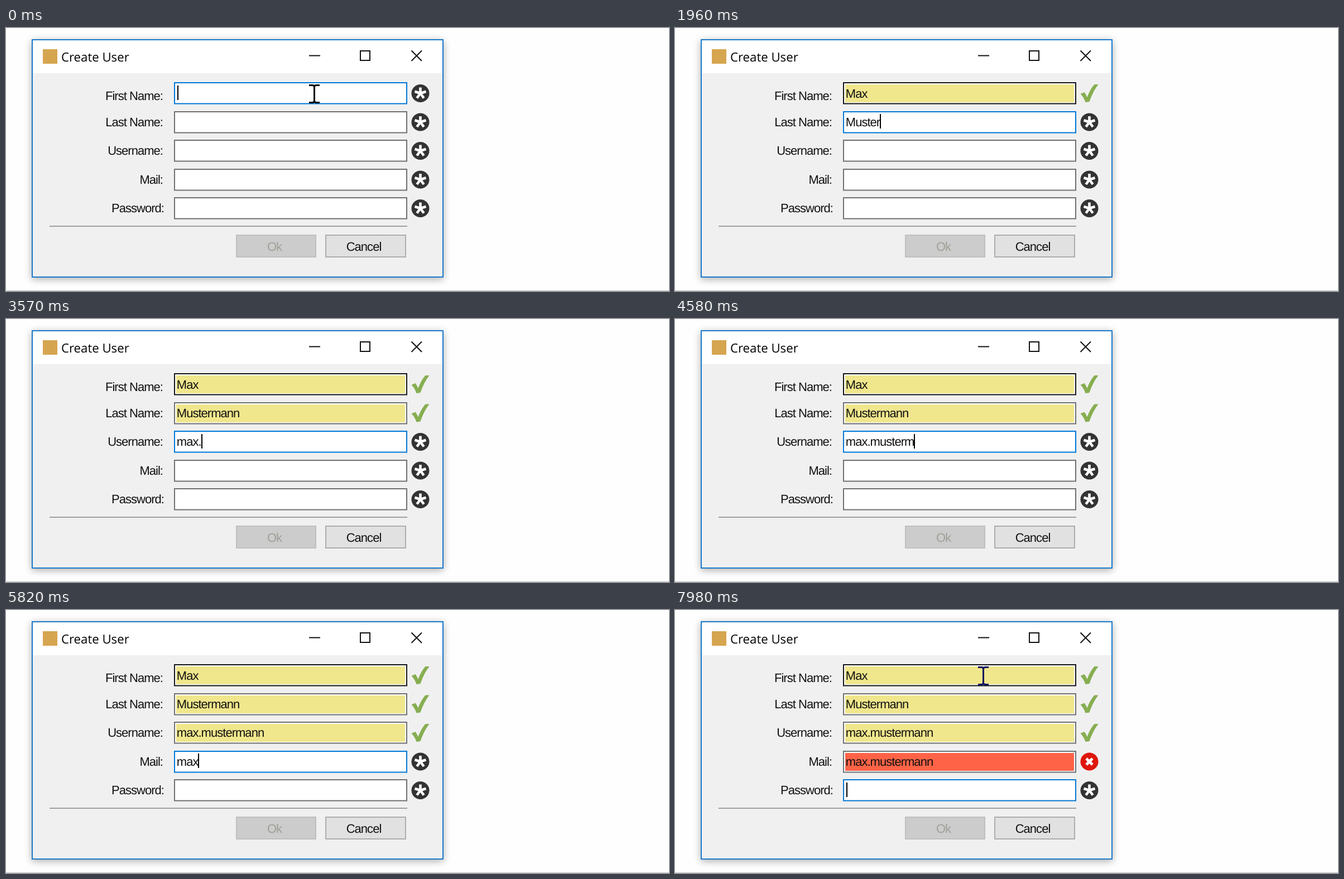
These frames come from a looping animation (1188x471 px, 8000 ms). An HTML page:

```html
<!DOCTYPE html>
<html lang="en">
<head>
<meta charset="utf-8">
<title>Create User</title>
<style>
  html, body { margin: 0; width: 100%; height: 100%; overflow: hidden; background: #fefefe; }
  svg { display: block; width: 1188px; height: 471px; }
  text { font: 22px "Liberation Sans", Arial, sans-serif; letter-spacing: -0.97px; fill: #111; text-rendering: geometricPrecision; white-space: pre; }
  .title { font: 22.2px "Open Sans", sans-serif; letter-spacing: 0; fill: #000; }
  .end { text-anchor: end; }
  .mid { text-anchor: middle; }
  .shadow { filter: blur(7px); }
</style>
</head>
<body>
<svg id="stage" viewBox="0 0 1188 471" xmlns="http://www.w3.org/2000/svg">
  <defs>
    <g id="required">
      <circle r="16" fill="#333"/>
      <g id="arms" stroke="#fff" stroke-width="4.6"></g>
    </g>
    <path id="valid" fill="#86ae50" d="M-16 1 L-9 -2 Q-6 2 -4 7 Q1 -7 9 -16 H16 Q6 -3 0 15 L-7 16 Q-10 7 -16 1Z"/>
    <g id="invalid">
      <circle r="16" fill="#df160c"/>
      <path d="M-5.5 -5.5 L5.5 5.5 M5.5 -5.5 L-5.5 5.5" stroke="#fff" stroke-width="5"/>
    </g>
  </defs>

  <rect y="470" width="1188" height="1" fill="#bdbdbd"/>
  <rect class="shadow" x="46" y="23" width="738" height="427" fill="#000" opacity=".32"/>
  <rect x="47" y="21" width="736" height="425" fill="#f0f0f0" stroke="#1a7acb" stroke-width="2"/>
  <rect x="48" y="22" width="734" height="59" fill="#fff"/>
  <rect x="66" y="38" width="26" height="26" fill="#d6a550"/>
  <text class="title" x="99" y="60">Create User</text>
  <path d="M543 49.5 H563 M635 41 H652 V58 H635Z M726.5 40.5 L745 59 M745 40.5 L726.5 59" fill="none" stroke="#111" stroke-width="2"/>

  <g id="rows"></g>

  <rect x="78" y="354" width="641" height="2" fill="#a0a0a0"/>
  <rect x="413" y="371" width="142" height="39" fill="#ccc" stroke="#bfbfbf" stroke-width="2"/>
  <text class="mid" x="481" y="399" style="fill:#a09f98">Ok</text>
  <rect x="573" y="371" width="143" height="39" fill="#e1e1e1" stroke="#adadad" stroke-width="2"/>
  <text class="mid" x="641" y="399">Cancel</text>

  <rect id="caret" width="2" height="26" fill="#000"/>
  <path id="pointer" fill="none" stroke-width="3" d="M543 102.5 H549 Q552.5 102.5 552.5 106 Q552.5 102.5 556 102.5 H562 M552.5 105 V131 M543 133.5 H549 Q552.5 133.5 552.5 130 Q552.5 133.5 556 133.5 H562"/>
</svg>
<script>
const LOOP = 8000, FADE_STEP = 77, TEXT_X = 305.8;
const BLUE = [0, 120, 215], GRAY = [112, 112, 112], BLACK = [22, 22, 22];
const KHAKI = "#f0e68c", TOMATO = "#ff6347";

// keys: [time, letters typed so far]; left: when the field is tabbed out of
const FIELDS = [
  { label: "First Name:", labelX: 281, value: "Max", left: 780,
    keys: [[400, 1], [550, 2], [630, 3]] },
  { label: "Last Name:", labelX: 281, value: "Mustermann", left: 2410,
    keys: [[1400, 1], [1630, 2], [1780, 4], [1940, 6], [2090, 7], [2170, 8], [2330, 10]] },
  { label: "Username:", labelX: 281, value: "max.mustermann", left: 5110,
    keys: [[3110, 1], [3190, 2], [3260, 3], [3570, 4], [3880, 5], [4030, 6], [4110, 7], [4260, 8],
           [4340, 9], [4490, 10], [4570, 11], [4730, 12], [4880, 13], [4960, 14]] },
  { label: "Mail:", labelX: 281, value: "max.mustermann", left: 7750, wrong: true,
    keys: [[5500, 1], [5580, 2], [5650, 3], [5890, 4], [6120, 5], [6430, 6], [6580, 7], [6740, 8],
           [6890, 9], [7050, 10], [7200, 11], [7290, 12], [7520, 13], [7590, 14]] },
  { label: "Password:", labelX: 283, value: "", left: Infinity, keys: [] }
];

const $ = id => document.getElementById(id);
const rowY = (top, i) => Math.round(top + 51.5 * i);
const mix = (a, b, p) => `rgb(${a.map((v, k) => Math.round(v + (b[k] - v) * p))})`;

// Border transition, advancing in coarse steps and easing out
function fade(since) {
  const p = Math.min(1, Math.max(0, Math.floor(since / FADE_STEP) / 4));
  return 1 - (1 - p) ** 2;
}

$("arms").innerHTML = [0, 72, 144, 216, 288]
  .map(a => `<path d="M0 0 V-10.5" transform="rotate(${a})"/>`).join("");

$("rows").innerHTML = FIELDS.map((f, i) => {
  const y = rowY(97, i), base = rowY(125, i) - (i ? 1 : 0);
  return `<text class="end" x="${f.labelX}" y="${i ? base : 129}">${f.label}</text>
    <rect id="box${i}" x="302" y="${y + 1}" width="416" height="37.5" fill="#fff" stroke-width="2"/>
    <rect id="fill${i}" x="305" y="${y + 4}" width="410" height="32" fill="${f.wrong ? TOMATO : KHAKI}"/>
    <text id="value${i}" x="${TEXT_X}" y="${base}"></text>
    <use id="icon${i}" x="742.5" y="${117 + 51.5 * i}"/>`;
}).join("");

function setIcon(i, name) {
  $("icon" + i).setAttribute("href", "#" + name);
}

function render(t) {
  const active = FIELDS.findIndex(f => t < f.left);

  FIELDS.forEach((f, i) => {
    const entered = i ? FIELDS[i - 1].left : -LOOP;
    const done = t >= f.left;
    const rest = i ? GRAY : BLACK;
    const border = done ? mix(BLUE, rest, fade(t - f.left)) : mix(GRAY, BLUE, fade(t - entered));
    const last = f.keys.filter(k => k[0] <= t).pop();

    $("box" + i).setAttribute("stroke", border);
    $("fill" + i).setAttribute("visibility", done ? "visible" : "hidden");
    $("value" + i).textContent = f.value.slice(0, last ? last[1] : 0);
    setIcon(i, !done ? "required" : f.wrong ? "invalid" : "valid");
  });

  const value = $("value" + active);
  const typing = value.textContent.length > 0;
  const caretX = typing ? Math.round(TEXT_X + value.getComputedTextLength()) : 307;
  $("caret").setAttribute("x", caretX);
  $("caret").setAttribute("y", rowY(102.5, active));

  // The pointer hides while typing and shows over the first field otherwise
  $("pointer").setAttribute("visibility", typing ? "hidden" : "visible");
  $("pointer").setAttribute("stroke", active ? "#0c1060" : "#000");
}

const start = performance.now();
function tick() {
  render((performance.now() - start) % LOOP);
  requestAnimationFrame(tick);
}
tick();
</script>
</body>
</html>
```
